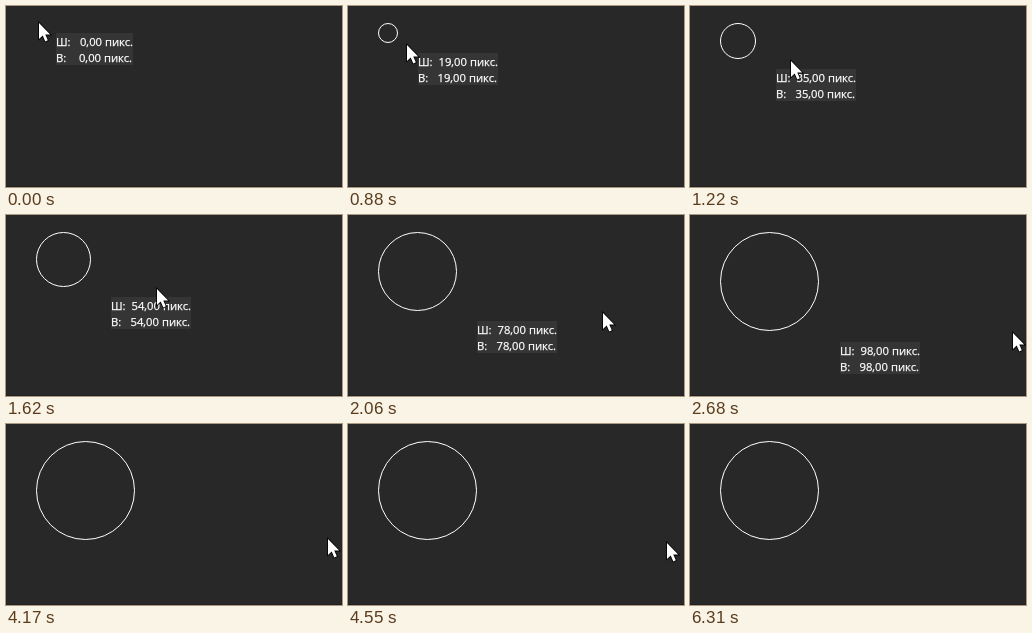
An HTML page for the animation above (7840 ms loop, 336 by 181 pixels).

```html
<!DOCTYPE html>
<html lang="ru">
<head>
<meta charset="utf-8">
<title>Рисование круга</title>
<style>
  html, body { margin: 0; width: 100%; height: 100%; overflow: hidden; background: #282828; }
  svg { display: block; width: 336px; height: 181px; }
  text { font: 11.25px "Open Sans", "Noto Sans", sans-serif; fill: #fff; stroke: #fff; stroke-width: .25; }
  .end { text-anchor: end; }
</style>
</head>
<body>
<svg viewBox="0 0 336 181">
  <rect width="336" height="181" fill="#282828"/>
  <rect y="180" width="336" height="1" fill="#202020"/>
  <circle id="circle" fill="none" stroke="#fff"/>
  <g id="label">
    <rect id="box" height="32" fill="#353535"/>
    <text y="13">Ш:</text>
    <text y="29">В:</text>
    <text id="width" class="end" y="13"></text>
    <text id="height" class="end" y="29"></text>
  </g>
  <path id="cursor" d="M0 0V16L3.7 12.6L6.3 18.4L8.8 17.3L6.3 11.6H11.2Z"
        fill="#fff" stroke="#000" stroke-width="1.6" paint-order="stroke"/>
</svg>
<script>
const LOOP = 7840;
const PRESS = 40;
const RELEASE = 4170;

// The pointer moves in bursts of even steps and rests in between.
const bursts = [
  { start: 480, end: 1220, count: 16 },
  { start: 1270, end: 2030, count: 14 },
  { start: 2060, end: 2680, count: 13 },
  { start: RELEASE, end: 4550, count: 7 },
  { start: 6050, end: 6310, count: 6 }
];

const drag = [
  { time: 440, x: 33, size: 0 },
  { time: 880, x: 59, size: 19 },
  { time: 1620, x: 151, size: 54 },
  { time: 2060, x: 255, size: 78 },
  { time: 2300, x: 297, size: 90 },
  { time: 2680, x: 323, size: 98 }
];

const [circle, label, box, widthText, heightText, cursor] =
  ["circle", "label", "box", "width", "height", "cursor"].map(id => document.getElementById(id));

const set = (node, attrs) => {
  for (const name in attrs) node.setAttribute(name, attrs[name]);
};
const progress = (t, start, end) => Math.max(0, Math.min(1, (t - start) / (end - start)));
const mix = (a, b, p) => Math.round(a + (b - a) * p);

// Steps fall on a 10 ms clock, hence the 5 ms tolerance.
function snap(t) {
  const burst = bursts.findLast(b => b.start <= t);
  if (!burst) return 0;
  const step = (burst.end - burst.start) / (burst.count - 1);
  return Math.min(burst.end, burst.start + Math.floor((t - burst.start + 5) / step) * step);
}

function pose(t) {
  const next = Math.max(1, drag.findIndex(k => k.time >= t));
  const i = t > drag.at(-1).time ? drag.length - 1 : next;
  const a = drag[i - 1], b = drag[i];
  const p = progress(t, a.time, b.time);
  const size = mix(a.size, b.size, p);

  const nudge = progress(t, RELEASE - 60, 4550);
  const leave = progress(t, 6000, 6310);
  return {
    size,
    x: mix(a.x, b.x, p) - 4 * nudge - 10 * leave,
    y: 17 + size + Math.min(3, size) + nudge - 7 * Math.sin(Math.PI * nudge) + 65 * leave
  };
}

function draw(t) {
  const { size, x, y } = pose(snap(t));
  const r = size / 2;
  set(circle, { cx: 30.5 + r, cy: 17.5 + r, r });
  set(cursor, { transform: `translate(${Math.round(x)} ${Math.round(y)})` });

  const labelX = t < PRESS ? 50 : Math.ceil(50.1 + 1.01 * size);
  const boxWidth = size < 10 ? 77 : 80;
  set(label, {
    transform: `translate(${labelX} ${labelX - 23})`,
    visibility: t < RELEASE ? "visible" : "hidden"
  });
  set(box, { width: boxWidth });
  set(widthText, { x: boxWidth });
  set(heightText, { x: boxWidth - 1 });
  widthText.textContent = heightText.textContent = `${size},00 пикс.`;
}

let origin;
function frame(now) {
  origin ??= now;
  draw((now - origin) % LOOP);
  requestAnimationFrame(frame);
}
draw(0);
requestAnimationFrame(frame);
</script>
</body>
</html>
```
